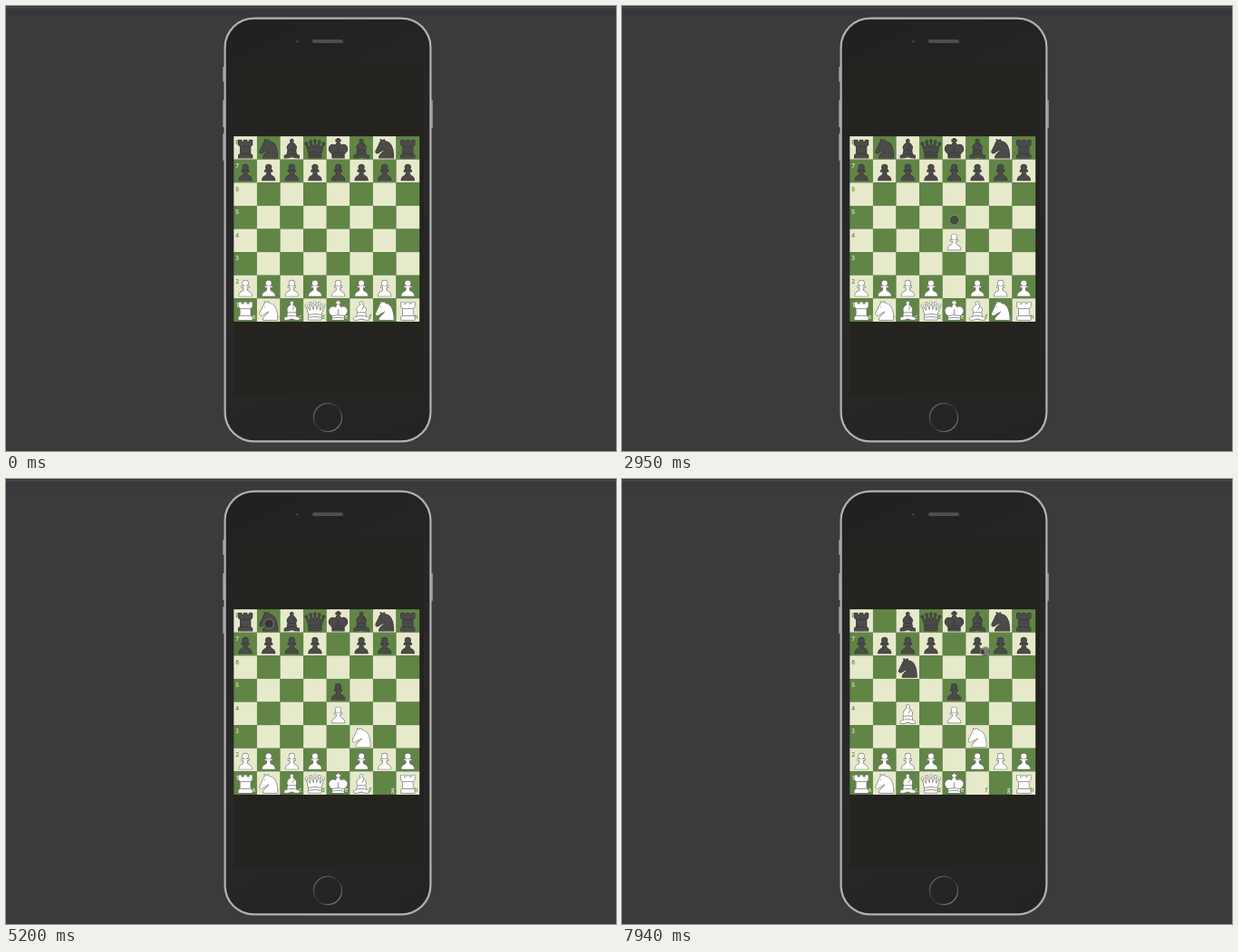
These frames come from a looping animation (673x492 px, 8000 ms). An HTML page with a canvas:

```html
<!DOCTYPE html>
<html lang="en">
<head>
<meta charset="utf-8">
<title>Chess on a phone</title>
<style>
  html, body { margin: 0; width: 100%; height: 100%; overflow: hidden; background: #3b3b3b; }
  canvas { display: block; }
</style>
</head>
<body>
<canvas id="stage" width="673" height="492"></canvas>
<script>
const ctx = document.getElementById('stage').getContext('2d');
const LOOP = 8000, CELL = 25.6, LEFT = 251.3, TOP = 144.1;
const LIGHT = '#e6eacb', DARK = '#608545', PICKED = '#b3c426';

const ball = (x, y, r) => `M${x - r} ${y}a${r} ${r} 0 1 1 ${2 * r} 0a${r} ${r} 0 1 1 ${-2 * r} 0z`;
const crown = [[-9.5, 8], [-4.8, 5.8], [0, 5], [4.8, 5.8], [9.5, 8]].map(([x, y]) => ball(x, y, 1.2)).join('');

// Each piece: outline and inner lines, x centred on the square, y from its top
const shapes = {
  p: ['M-7 23q0-4 4-5.2q2-1.5 1.2-4.5h-2.2v-1.3h8v1.3h-2.2q-.8 3 1.2 4.5q4 1.2 4 5.2z' + ball(0, 8.8, 3), ''],
  r: ['M-7.5 23.8v-3l2-1.5v-8l-2-2v-5h3.2v2h2.6v-2h3.4v2h2.6v-2h3.2v5l-2 2v8l2 1.5v3z',
      'M-5.5 11.3h11M-5.5 19.3h11'],
  n: ['M-6 23.8c0-5 6.5-6 6.5-10c-2 2-4 2.2-5 2.8c-1.5 1-2.5 2.5-4 2c-1.5-.5-1.5-2-.5-3.5' +
      'L-6 9c.2-2 1.5-2.5 2-3.5l-.5-2 2.5 1.5 1.5-1.5.8 2c6 .5 9.5 6 9.5 18.3z', 'M-4.6 9.6l1-.6M-7.6 15.6h.6'],
  b: ['M-8 23.8v-2.5q4-1 5.5-2h-2.5l.8-4q-2.8-4.5 4.2-9q7 4.5 4.2 9l.8 4h-2.5q1.5 1 5.5 2v2.5q-5 0-8-1.5q-3 1.5-8 1.5z' +
      ball(0, 5, 1.7), 'M.8 12.5l2.2-4.3M-4.2 15.8q4.2-1 8.4 0M-3 19.3h6'],
  q: ['M-6.8 23.5L-7 18-9.5 8.5-5.3 14-4.8 6-1.7 13.5 0 5 1.7 13.5 4.8 6 5.3 14 9.5 8.5 7 18 6.8 23.5z' + crown,
      'M-7 18q7-1.5 14 0M-6.8 21q6.8-1.5 13.6 0'],
  k: ['M-6.5 23.8v-4.5C-13 15-9.5 8-4 9.5Q-1.5 10 0 12Q1.5 10 4 9.5C9.5 8 13 15 6.5 19.3v4.5z' +
      'M0 14C-4 9-2 7 0 7s4 2 0 7zM-.9 8v-2.5h-1.6v-1.6h1.6v-1.4h1.8v1.4h1.6v1.6h-1.6v2.5z',
      'M0 12v6M-6.5 19.3q6.5-2 13 0M-6.5 21.8q6.5-1.5 13 0']
};
for (const key in shapes) shapes[key] = shapes[key].map(d => new Path2D(d));

const start = ['rnbqkbnr', 'pppppppp', '', '', '', '', 'PPPPPPPP', 'RNBQKBNR'];

// The piece follows the finger from pick to drop and settles at land
const moves = [
  { from: [4, 6], to: [4, 4], pick: 2260, drop: 2450, land: 2530 },
  { from: [4, 1], to: [4, 3], pick: 3480, drop: 3690, land: 3780 },
  { from: [6, 7], to: [5, 5], pick: 4410, drop: 4710, land: 4790 },
  { from: [1, 0], to: [2, 2], pick: 5370, drop: 5790, land: 5900 },
  { from: [5, 7], to: [2, 4], pick: 7230, drop: 7500, land: 7600 }
];

// Finger path: time, x, y
const touch = [
  [1220, 630, 279], [1500, 520, 334], [1800, 420, 322], [2000, 374, 310], [2160, 368, 309],
  [2260, 368, 309], [2450, 367, 262], [2700, 367, 262], [3350, 366, 186], [3480, 366, 186],
  [3690, 366, 242], [3760, 366, 242], [4330, 414, 333], [4410, 414, 333], [4640, 388, 282],
  [4750, 388, 282], [5200, 290, 160], [5400, 290, 160], [5780, 318, 211], [5880, 318, 211],
  [6140, 393, 328], [6440, 395, 335], [7230, 395, 335], [7480, 317, 262], [7720, 317, 262],
  [7940, 401, 191], [8000, 401, 191]
];

function fingerAt(t) {
  const i = touch.findIndex(key => key[0] > t);
  if (i < 1) return null;
  const [t0, x0, y0] = touch[i - 1], [t1, x1, y1] = touch[i];
  const u = (t - t0) / (t1 - t0), k = t < 2000 ? u : u * u * (3 - 2 * u);
  return [x0 + (x1 - x0) * k, y0 + (y1 - y0) * k];
}

function box(x, y, w, h, fill, r = 0) {
  ctx.fillStyle = fill;
  ctx.beginPath();
  ctx.roundRect(x, y, w, h, r);
  ctx.fill();
}

function gradient(x0, y0, x1, y1, ...colors) {
  const g = ctx.createLinearGradient(x0, y0, x1, y1);
  colors.forEach((c, i) => g.addColorStop(i / (colors.length - 1), c));
  return g;
}

function drawPhone() {
  box(0, 0, 673, 492, '#3b3b3b');
  box(0, 0, 673, 11, '#38383c');
  box(0, 1, 673, 1.5, '#4a4a48');
  for (const [x, y, h] of [[239, 67, 17], [239, 104, 30], [239, 141, 30], [468.5, 104, 31]])
    box(x, y, 2.5, h, '#8a8a8a', 1);
  box(240.5, 12.5, 229, 470, '#b2b2b2', 33);
  box(242.7, 14.7, 224.6, 465.6, gradient(242, 14, 467, 480, '#202020', '#292929', '#232323'), 31);
  box(251, 65, 210, 364, '#252320');
  box(338, 37, 34, 4, '#4e4e4e', 2);
  box(320, 38, 2.4, 2.4, '#4a4a50', 1.2);
  ctx.lineWidth = 1.2;
  ctx.strokeStyle = gradient(344, 444, 366, 467, '#666', '#2c2c2c', '#777');
  ctx.beginPath();
  ctx.arc(355, 455, 15.6, 0, 7);
  ctx.stroke();
}

function drawBoard(picked) {
  ctx.font = '600 6.5px "Open Sans", sans-serif';
  for (let row = 0; row < 8; row++) for (let col = 0; col < 8; col++) {
    const x = LEFT + col * CELL, y = TOP + row * CELL, dark = (row + col) % 2;
    const isPicked = picked && picked[0] === col && picked[1] === row;
    box(x, y, CELL + .1, CELL + .1, isPicked ? PICKED : dark ? DARK : LIGHT);
    ctx.fillStyle = dark ? LIGHT : DARK;
    ctx.textAlign = 'left';
    if (col === 0) ctx.fillText(8 - row, x + 2, y + 9.3);
    ctx.textAlign = 'right';
    if (row === 7) ctx.fillText('abcdefgh'[col], x + CELL - 1.8, y + CELL - 3.4);
  }
}

function drawPiece(piece, x, y) {
  const white = piece < 'a', [outline, lines] = shapes[piece.toLowerCase()];
  ctx.save();
  ctx.translate(x + CELL / 2, y);
  ctx.lineJoin = 'round';
  ctx.strokeStyle = white ? '#777' : '#383636';
  ctx.lineWidth = 1.3;
  ctx.stroke(outline);
  ctx.fillStyle = white ? '#fff' : '#4d4a4a';
  ctx.fill(outline);
  ctx.lineWidth = .8;
  ctx.stroke(lines);
  ctx.restore();
}

function drawFinger([x, y]) {
  ctx.beginPath();
  ctx.arc(x, y, 5.4, 0, 7);
  ctx.fillStyle = 'rgba(40,40,40,.57)';
  ctx.fill();
  ctx.lineWidth = 1;
  ctx.strokeStyle = 'rgba(165,165,155,.6)';
  ctx.stroke();
}

function render(t) {
  const board = start.map(row => [...row]);
  const finger = fingerAt(t);
  let held = null;
  for (const { from: [c, r], to, pick, drop, land } of moves) {
    if (t < pick) break;
    const piece = board[r][c];
    board[r][c] = '';
    if (t >= land) board[to[1]][to[0]] = piece;
    else if (t < drop) held = { piece, square: [c, r], grab: fingerAt(pick) };
  }
  drawPhone();
  drawBoard(held && held.square);
  board.forEach((row, r) => row.forEach((piece, c) => {
    if (piece) drawPiece(piece, LEFT + c * CELL, TOP + r * CELL);
  }));
  if (held) {
    const { piece, square: [c, r], grab } = held;
    drawPiece(piece, LEFT + c * CELL + finger[0] - grab[0], TOP + r * CELL + finger[1] - grab[1]);
  }
  if (finger) drawFinger(finger);
}

const began = performance.now();
function tick() {
  render((performance.now() - began) % LOOP);
  requestAnimationFrame(tick);
}
tick();
</script>
</body>
</html>
```
